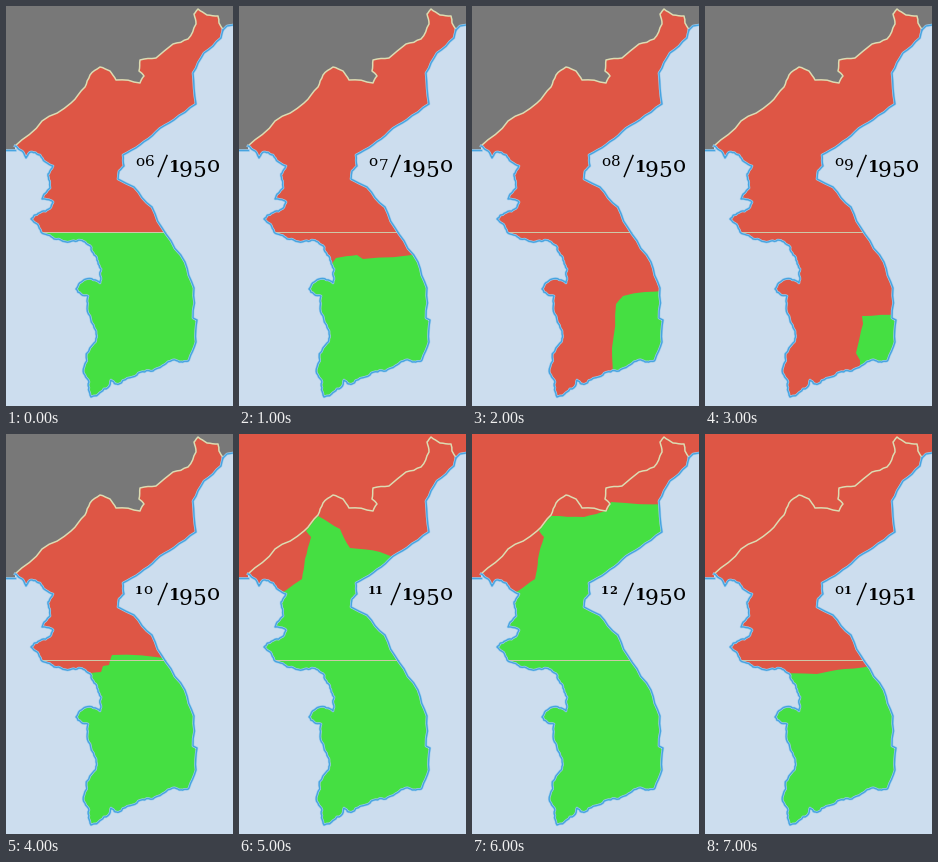
Recreate the animation shown at these times as a matplotlib script. Size 227 by 400 pixels, loop 8 s.

```python
import numpy as np
import matplotlib.pyplot as plt
from matplotlib.animation import FuncAnimation
from matplotlib.patches import Polygon

W, H, DPI = 227, 400, 64
SEA, GRAY, RED, GREEN = "#ccddee", "#787878", "#de5645", "#45df42"
COAST, HALO, BORDER, PARALLEL = "#47a4e0", "#a6cfee", "#dcdcb2", "#cdc8a8"
START, ENTRY = 5, 5  # June of the first year; step at which the north-west turns red

# Key points in pixels, clockwise from the north-west river mouth
RIVER = [(9, 140), (36, 115), (65, 97), (79, 81), (84, 69), (94, 61),
         (104, 65), (110, 74), (134, 77), (138, 70), (133, 65), (134, 54),
         (150, 52), (167, 38), (182, 33), (190, 18), (188, 8), (192, 3),
         (201, 9), (212, 10), (213, 17), (217, 24)]
EAST = [(217, 24), (215, 32), (198, 47), (187, 67), (190, 98), (168, 114),
        (150, 126), (134, 139), (117, 149), (118, 160), (113, 165), (112, 173),
        (128, 181), (146, 201), (160, 228), (179, 256), (188, 282), (187, 312),
        (191, 314), (190, 336), (183, 354)]
SOUTH = [(183, 354), (174, 356), (167, 354), (158, 359), (147, 365), (131, 369),
         (113, 378), (105, 374), (95, 386), (85, 391), (83, 376), (78, 361)]
WEST = [(78, 361), (88, 337), (90, 325), (84, 310), (82, 290), (70, 283),
        (80, 273), (94, 277), (95, 263), (88, 249), (79, 236), (66, 235),
        (48, 233), (35, 226), (25, 213), (33, 207), (45, 201), (47, 196),
        (36, 193), (44, 182), (42, 168), (47, 160), (34, 149), (25, 146),
        (20, 152), (17, 146), (9, 140)]

# Front line of each month, west to east
WEST_POCKET = [(10, 170), (46, 157), (63, 145), (66, 125), (72, 103), (67, 97),
               (79, 82)]
FRONTS = [
    [(20, 226), (165, 226)],
    [(60, 259), (93, 258), (97, 252), (118, 249), (124, 253), (185, 247)],
    [(141, 380), (140, 342), (144, 298), (151, 290), (195, 284)],
    [(155, 380), (155, 354), (151, 347), (158, 318), (157, 310), (195, 309)],
    [(70, 240), (95, 238), (97, 232), (103, 231), (106, 221), (165, 225)],
    WEST_POCKET + [(101, 95), (111, 114), (141, 118), (165, 126)],
    WEST_POCKET + [(112, 83), (136, 76), (139, 68), (196, 70)],
    [(60, 238), (112, 240), (140, 235), (175, 231)],
]

rng = np.random.default_rng(5)


def roughen(points, rough, passes=2):
    """Fractal line: push each midpoint sideways in proportion to its segment."""
    p = np.array(points, float)
    for _ in range(passes):
        step = np.diff(p, axis=0)
        side = np.column_stack([-step[:, 1], step[:, 0]])
        push = rng.uniform(-rough, rough, (len(step), 1))
        out = np.empty((2 * len(p) - 1, 2))
        out[::2], out[1::2] = p, p[:-1] + step / 2 + push * side
        p = out
    return p


def px(size):
    return size * 72 / DPI


def numerals(x, base, text, em):
    """Old-style figures: 0-2 at x-height, 6 and 8 rising, the rest hanging."""
    made = []
    for d in text:
        step = {"0": .61, "1": .43}.get(d, .56) * em
        small = d in "12"
        drop = .19 * em if d in "34579" else 0
        made.append(ax.text(x + step / 2, base + drop, "o" if d == "0" else d,
                            family="DejaVu Serif", ha="center", va="baseline",
                            size=px((.67 if small else .9) * em),
                            weight="bold" if small else "normal",
                            color="black", zorder=6))
        x += step
    return made


fig = plt.figure(figsize=(W / DPI, H / DPI), dpi=DPI, facecolor=SEA)
ax = fig.add_axes([0, 0, 1, 1])
ax.set(xlim=(0, W), ylim=(H, 0))
ax.axis("off")

river = roughen(RIVER, .06)
shore = np.vstack([roughen(EAST, .05), roughen(SOUTH, .18, 3),
                   roughen(WEST, .14, 3)])
fronts = [roughen(f, .03) if i else np.array(f) for i, f in enumerate(FRONTS)]
west_shore = np.array([(0, 144), (9, 144)])
east_shore = np.array([(217, 24), (221, 20), (W, 19)])

china = Polygon(np.vstack([[(0, 0)], west_shore, river, east_shore, [(W, 0)]]),
                lw=0, zorder=1)
land = Polygon(np.vstack([river, shore]), fc=RED, lw=0, zorder=2)
south = Polygon(fronts[0], fc=GREEN, lw=0, zorder=3)
for patch in (china, land, south):
    ax.add_patch(patch)
south.set_clip_path(land)

ax.plot([34, 160], [225.5, 225.5], color=PARALLEL, lw=px(1), zorder=4)
ax.plot(*river.T, color=BORDER, lw=px(1.5), zorder=4)
for line in (shore, west_shore, east_shore):
    ax.plot(*line.T, color=HALO, lw=px(2.6), zorder=4.5)
    ax.plot(*line.T, color=COAST, lw=px(1.4), zorder=5)
ax.plot([152.3, 161], [170.5, 149.5], color="black", lw=px(1.5), zorder=6)

label = []


def draw(i):
    years, month = divmod(START + i, 12)
    front = fronts[i]
    china.set_facecolor(GRAY if i < ENTRY else RED)
    south.set_xy(np.vstack([front, [(W, front[-1, 1]), (W, H),
                                    (front[0, 0], H)]]))
    while label:
        label.pop().remove()
    label.extend(numerals(129, 160.5, f"{month + 1:02d}", 17))
    label.extend(numerals(163, 166, str(1950 + years), 24))
    return [china, south, *label]


anim = FuncAnimation(fig, draw, frames=len(fronts), interval=1000,
                     init_func=lambda: draw(0), repeat=True, repeat_delay=0)
plt.show()
```
